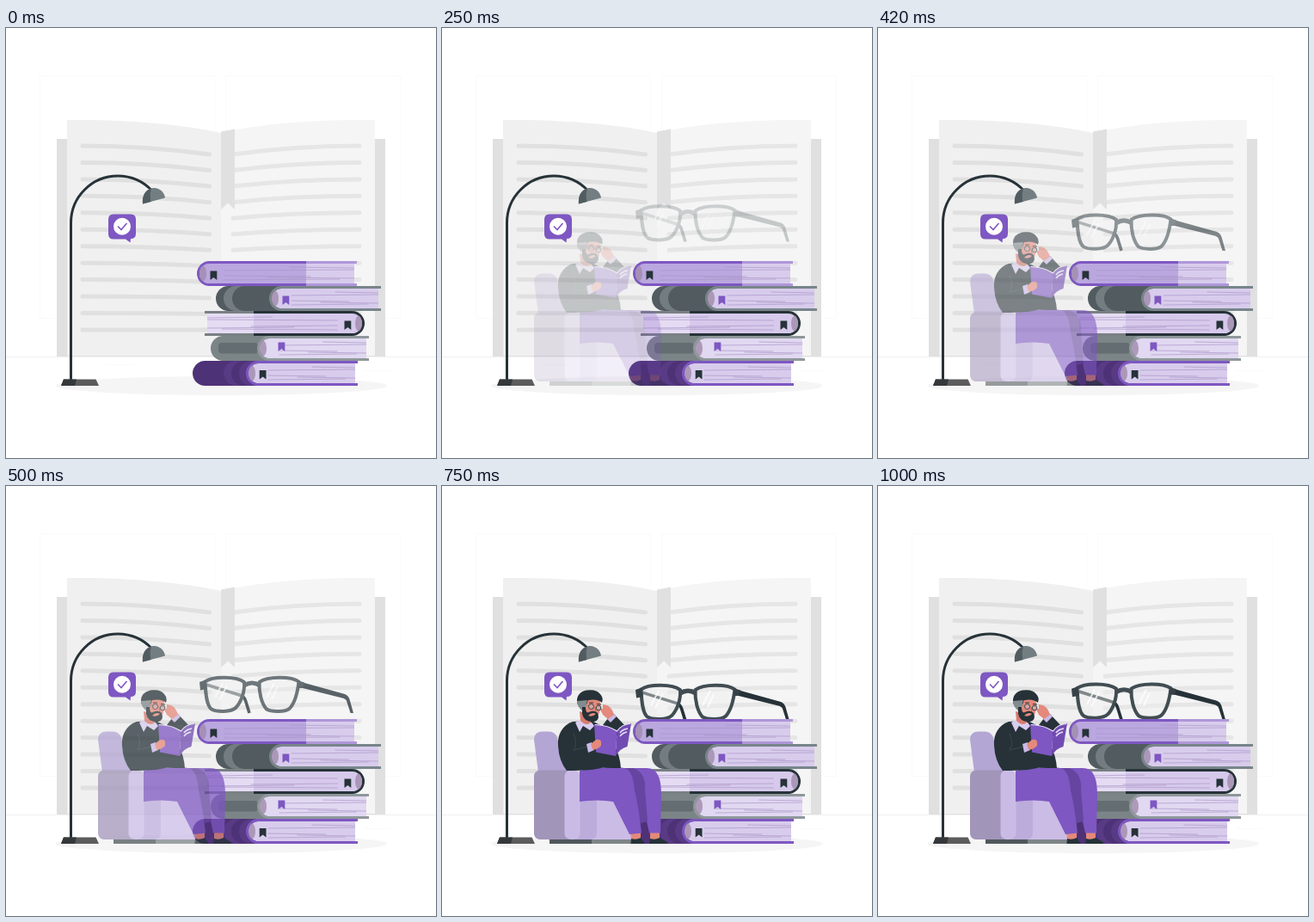
Animation of 500x500 px, one loop 1040 ms. Source, as an HTML page:

```html
<!DOCTYPE html>
<html lang="en">
<head>
<meta charset="utf-8">
<title>Reading</title>
<style>
html, body { margin: 0; width: 100%; height: 100%; overflow: hidden; background: #fff; }
svg { display: block; width: 100vw; height: 100vh; }
</style>
</head>
<body>
<svg viewBox="0 0 500 500" fill="none">
  <!-- room -->
  <path d="M0 382.500H500" stroke="#f0f0f0"/>
  <path d="M39.500 55.500H242.500V337.500H39.500ZM255.500 55.500H458.500V337.500H255.500ZM416 398.500H447M115 391.500H150" stroke="#fafafa"/>
  <ellipse cx="250" cy="416" rx="193" ry="11" fill="#f5f5f5"/>

  <!-- large open book -->
  <path d="M59 129H441V382H59Z" fill="#e0e0e0"/>
  <path d="M71 107C140 106 205 112 250 122V381H71Z" fill="#f0f0f0"/>
  <path d="M250 122C295 111 360 106 429 107V381H250Z" fill="#f5f5f5"/>
  <g id="lines" stroke-width="5" stroke-linecap="round"></g>
  <path d="M250 120.500L266 117.500V211L258 203.500L250 211Z" fill="#e0e0e0"/>

  <!-- glasses -->
  <g id="glasses">
    <path d="M233 238L273 250.500Q277 252 278.500 256.500L283 271" stroke="#263238" stroke-width="3.600"/>
    <path d="M340 234L394 249Q398 250.500 399.500 255L404 271H400.500L396 257Q395 254.500 391 253.500L341 241Z" fill="#263238"/>
    <g fill="#eee" fill-opacity=".45" stroke="#414d52" stroke-width="4" stroke-linejoin="round">
      <path d="M231.500 234.500C240 228 268 228 277 235C278 248 272 260 267 265C262 270 245 270 239 266.500C233 262 232 247 231.500 234.500Z"/>
      <path d="M294.500 235C304 228 332 228 340.500 234.500C339 247 335 260 330 265.500C325 270 309 270 303 266.500C297 260 294 247 294.500 235Z"/>
    </g>
    <path d="M277 239Q286 233 295 239" stroke="#414d52" stroke-width="5"/>
    <path d="M225 235L232 232.500L234 243L226 244.500ZM339 233L347 235.500L345 242L339 242Z" fill="#364247"/>
    <path d="M243 253L252 236M248 256L257 239M303 253L312 236M309 255L316 240" stroke="#fff" stroke-width="2" stroke-opacity=".75"/>
  </g>

  <g id="stack"></g>

  <!-- lamp -->
  <path d="M75.500 410V226.500A54.500 54.500 0 0 1 130 172A54.500 54.500 0 0 1 170 189.500" stroke="#263238" stroke-width="3"/>
  <path d="M159 204.500C158 195 163 188 169 186.500C177 184.500 184 190 185 197.500Z" fill="#737e82"/>
  <path d="M159 204.500C158 195 162 188 169 187C167 192 167.500 197 168.500 202Z" fill="#515c60"/>
  <path d="M67 408.500H104.500L108 416H64Z" fill="#5c5c5c"/>
  <path d="M67 408.500H82L80 416H64Z" fill="#34383b"/>

  <!-- speech bubble -->
  <path d="M125 216.500H145Q151 216.500 151 222.500V239Q151 245 145 245L144.500 249.500L139 245.500H125Q119 245.500 119 239.500V222.500Q119 216.500 125 216.500Z" fill="#7e57c2"/>
  <circle cx="135" cy="230.800" r="10" fill="#fff"/>
  <path d="M130 230.500L134 234.500L140.500 227" stroke="#7e57c2" stroke-width="1.600"/>

  <g id="reader">
    <!-- armchair -->
    <path d="M125 410H220V416H125Z" fill="#7f8588"/>
    <path d="M125 410H174V416H125Z" fill="#50585c"/>
    <path d="M107 295Q107 285.500 117 285.500H124Q132 285.500 134 293L146 333H112Z" fill="#b4a6d4"/>
    <path d="M155 362H220V411H155Z" fill="#cbbce6"/>
    <path d="M155 362H180V403Q180 411 172 411H155Z" fill="#bbacdc"/>
    <rect x="107" y="330.500" width="46" height="80.500" rx="7" fill="#a295ba"/>
    <rect x="142.500" y="330.500" width="18" height="80.500" rx="7" fill="#cabbe6"/>

    <!-- feet -->
    <path d="M219 401H231V411H220ZM242 401H253V411H242Z" fill="#e4897b"/>
    <path d="M220 410Q226 412 231 409L236 416H219.500ZM242 410Q248 412 253 409L262 414V416H241Z" fill="#263238"/>

    <!-- legs -->
    <path d="M208 328H238C251 328 255 341 255 358L254 403.500H241L231 358Z" fill="#7e57c2"/>
    <path d="M212 328H222C234 331 237 344 236 352L239 390L231 392L218 350Z" fill="#6545a0"/>
    <path d="M160 331C180 326 210 326 215 329C222 334 223 345 224 354Q229 375 232 403.500L218 405L199 367Q180 364 160 367Z" fill="#7e57c2"/>

    <!-- torso -->
    <path d="M152 274C140 278 134 289 135 302Q136 320 145 331Q175 331 187 327.500Q198 328 208 328Q207 313 200 301L184 278L174 273Z" fill="#263238"/>
    <path d="M184 282L193 270L200 265L213 279Q216 284 212 287L200 292Z" fill="#263238"/>
    <path d="M155 275L160 272L174 275L177 279L172 284L164 279L160 286Z" fill="#d8cdee"/>
    <path d="M153 288Q158 299 153 307L170 303" stroke="#39464c"/>

    <!-- raised hand -->
    <path d="M192 271L199 264L203 268L196 275Z" fill="#c9b9e8"/>
    <path d="M193 271L187 266L183 258L187 259L187 254L192 255Q198 258 200 266Z" fill="#e4897b"/>

    <!-- head -->
    <path d="M160 262L173 266L173 275Q168 280 161 273Z" fill="#d97b6d"/>
    <path d="M162 248L183 247Q186 257 182 266Q174 274 165 267Q160 259 162 248Z" fill="#e4897b"/>
    <path d="M157 252Q156 240 168 237.500Q180 236 184 242Q188 246 186 252Q181 247 170 249L168 254H158Z" fill="#263238"/>
    <path d="M157 250L169 249L167 256L163 261Q157 257 157 250Z" fill="#828b8e"/>
    <path d="M163 257L167 257Q167 265 171 263Q177 260 181 264Q184 272 177 274Q165 275 163 265Z" fill="#263238"/>
    <path d="M170 267Q174 262.500 179 265Q175 269 170 267Z" fill="#e4897b"/>
    <path d="M161 254L171 256" stroke="#7c9095" stroke-width="1.200"/>
    <g fill="#c4d0d2" fill-opacity=".4" stroke="#37474f">
      <circle cx="173.500" cy="256.500" r="3"/><circle cx="182" cy="258" r="2.800"/>
    </g>
    <path d="M171 252L176 252M180 253.500L185 254" stroke="#263238" stroke-width="1.200"/>
    <path d="M178 257L179 262" stroke="#b85f55"/>

    <!-- held book -->
    <path d="M177 277Q193 278 203.500 285L202 314L179 309.500Z" fill="#7e57c2"/>
    <path d="M203.500 285Q209 277 220 276L215.500 303Q207 305 202 314Z" fill="#714bb3"/>
    <path d="M178 277.500Q193 278 203.500 285Q209 277 219 276.500" stroke="#eee8f7" stroke-width="1.200"/>
    <path d="M207 287Q210 283 216 282M207 291Q210 287 215 286" stroke="#e8def5" stroke-width="1.500"/>
    <path d="M168 300L174 298L177 307L170 310Z" fill="#c9b9e8"/>
    <path d="M173 300L179 295Q185 294 185 298V302Q180 307 175 306.500Z" fill="#e4897b"/>
  </g>
</svg>
<script>
const byId = id => document.getElementById(id);

// printed lines, flattening towards the foot of the page
let text = '';
for (let i = 0; i < 12; i++) {
  const y = 137 + i * 19.45, end = y + 10 - i * 0.9;
  text += `<path d="M89 ${y}Q165 ${y} 236.500 ${end}" stroke="#e0e0e0"/>
    <path d="M411 ${y}Q335 ${y} 264 ${end}" stroke="#e6e6e6"/>`;
}
byId('lines').innerHTML = text;

const mark = (x, y, fill) => `<path d="M${x} ${y}h7.800v10.500l-3.900-3-3.900 3z" fill="${fill}"/>`;

const spine = (x, y, end, fill) =>
  `<path d="M${end} ${y}H${x + 14.5}a14.500 14.500 0 0 0 0 29H${end}z" fill="${fill}"/>`;

// a closed book whose rounded side is at x0; split is where the shaded half stops
function book(x0, x1, y, cover, { split, shade, pages = '#d8ccec' } = {}) {
  const cap = x0 + 14.5, edge = x1 - 3;
  const block = (end, fill) => `<path d="M${end} ${y + 3}H${cap}a11.500 11.500 0 0 0 0 23H${end}z" fill="${fill}"/>`;
  let out = block(edge, pages);
  if (split) out += block(split, shade);
  out += `<path d="M${x1} ${y + 1.5}H${cap}a13 13 0 0 0 0 26H${x1}" stroke="${cover}" stroke-width="3"/>`;
  if (split) out += `<path d="M${split} ${y + 1.5}H${x1}M${split} ${y + 27.5}H${x1}" stroke="#fff" stroke-opacity=".38" stroke-width="3"/>`;
  out += `<ellipse cx="${x0 + 7}" cy="${y + 14.5}" rx="4" ry="9" fill="#a08bab" fill-opacity=".8"/>`;
  [[7, .55, 1, 1], [11, .1, 1, -1], [17, .1, .7, 1], [19, .4, 1, 1], [22, .1, .9, -1]].forEach(([dy, a, b, tilt]) => {
    const at = k => cap + (edge - cap) * k;
    out += `<path d="M${at(a)} ${y + dy}L${at(b)} ${y + dy + tilt}" stroke="#a994c6" stroke-opacity=".75" stroke-width=".9"/>`;
  });
  return out;
}

const purple = '#7e57c2', dark = '#263238';
byId('stack').innerHTML =
  spine(217, 387, 300, '#4e3277') +
  [253, 262, 271].map((x, i) => spine(x, 387, 300, i % 2 ? '#4e3277' : '#583a85')).join('') +
  book(279, 409, 387, purple) + mark(294.7, 398, dark) +
  spine(238, 358, 308, '#7b8487') +
  '<rect x="247" y="366" width="46" height="12.500" rx="4" fill="#646d71"/>' +
  book(292, 422, 358, '#8f989b', { pages: '#e1d8f1' }) + mark(316.5, 365.5, purple) +
  `<g transform="translate(648) scale(-1 1)">${book(231, 417, 329, dark, { split: 360, shade: '#d6c9eb', pages: '#e5dcf3' })}</g>` +
  mark(393.5, 340.5, dark) +
  spine(244, 300, 322, '#525c60') + spine(253, 300, 322, '#737d81') + spine(263, 300, 322, '#525c60') +
  book(306, 436, 300, '#78858a') + mark(321.5, 311.5, purple) +
  book(222, 408, 271, purple, { split: 349, shade: '#baa7df' }) + mark(237.5, 282.5, dark);

const bezier = (s, a, b) => 3 * (1 - s) ** 2 * s * a + 3 * (1 - s) * s * s * b + s ** 3;

// cubic-bezier(.36, -.01, .5, 1.38)
function ease(x) {
  let lo = 0, hi = 1;
  for (let i = 0; i < 24; i++) {
    const mid = (lo + hi) / 2;
    if (bezier(mid, 0.36, 0.5) < x) lo = mid; else hi = mid;
  }
  return bezier(lo, -0.01, 1.38);
}

const LOOP = 1040, FPS = 24, DROP = 30;
const glasses = byId('glasses'), reader = byId('reader');

function draw() {
  const t = performance.now() % LOOP;
  const step = Math.floor(t * FPS / 1000 + 0.1);
  const p = step < 3 ? 0 : ease(Math.min(1, step / FPS));
  const alpha = Math.max(0, Math.min(1, p));
  reader.setAttribute('opacity', alpha);
  glasses.setAttribute('opacity', alpha);
  glasses.setAttribute('transform', `translate(0 ${DROP * (p - 1) + 0.7})`);
  requestAnimationFrame(draw);
}
draw();
</script>
</body>
</html>
```
